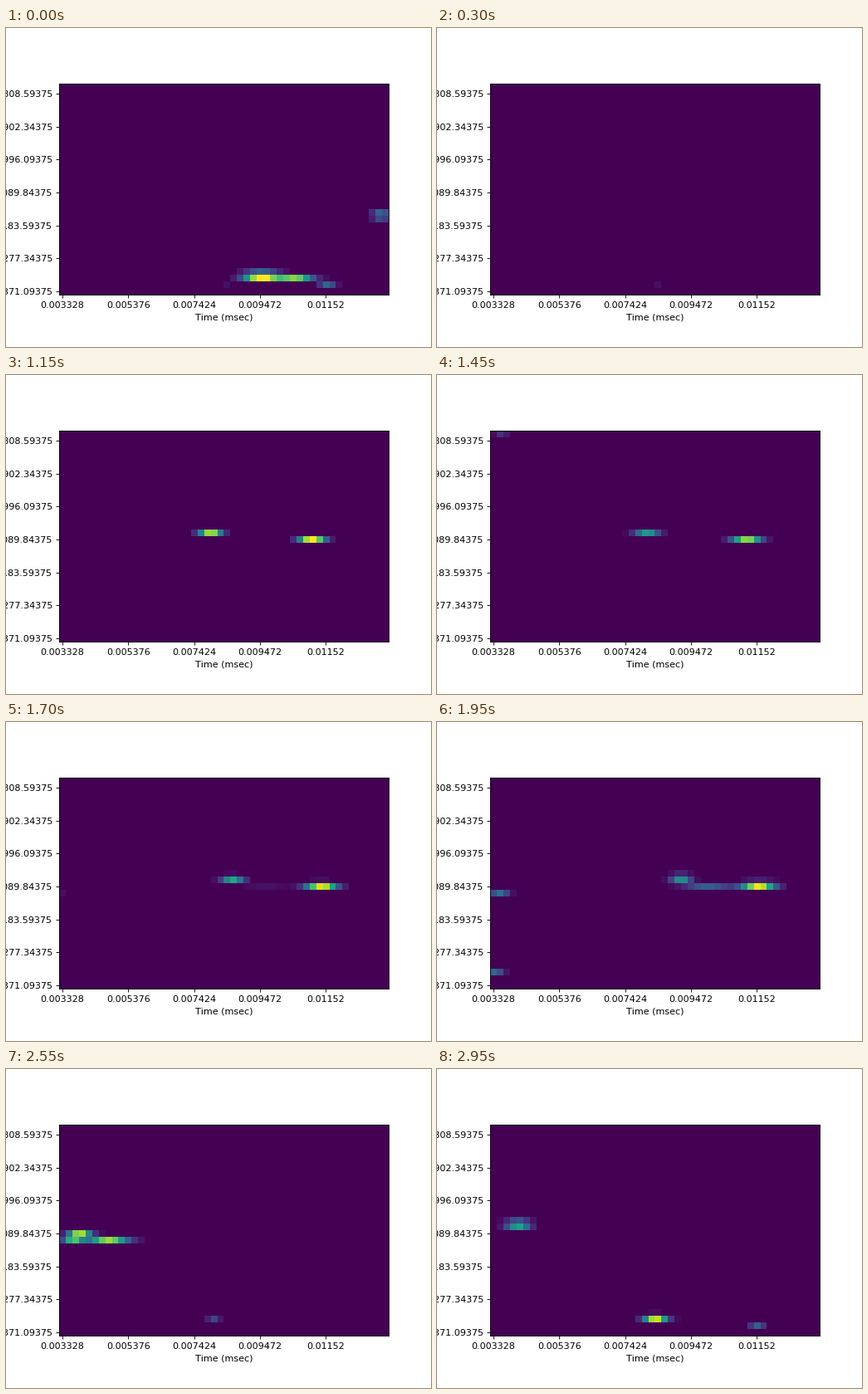
These frames come from a looping animation (512 px wide and 384 px high, 3000 ms). A matplotlib script:

```python
import numpy as np
import matplotlib.pyplot as plt
from matplotlib.animation import FuncAnimation

ROWS, COLS = 32, 50
FRAMES, INTERVAL = 60, 50
FADE = 6          # frames a pulse takes to appear or vanish
DRIFT = 0.35      # columns per frame while it fades
THICKNESS = 0.5   # rows
FLOOR = 0.025     # weaker energy is not shown

# Each pulse is a path of key points: (frame, column, row, width, peak).
PULSES = [
    # opening burst
    [(0, 30.2, 28.65, 2.6, 1.7)],
    [(0, 35.3, 29, 2.6, 0.8)],
    [(0, 40.2, 30, 1.3, 0.33)],
    [(0, 48.3, 19.45, 1.3, 0.75)],
    [(0, 25, 30, 0.4, 0.04), (8, 25, 30, 0.4, 0.04)],
    # two pulses in the middle band, the left one with a tail
    [(17, 21.6, 15, 1.6, 1.25), (29, 23.3, 15, 1.9, 0.55),
     (39, 28.5, 14.7, 1.5, 0.75)],
    [(39, 32.5, 16, 3.5, 0.3)],
    [(17, 37.3, 16, 1.7, 1.25), (29, 38.4, 16, 2.2, 0.85),
     (39, 40.2, 15.8, 2.5, 1.15)],
    [(29, 1.2, 0, 1, 0.14)],
    # pulses entering from the left
    [(39, 0.9, 17, 1.4, 0.37), (51, 1.6, 17, 1.5, 0.7)],
    [(51, 7, 17, 3, 0.85)],
    [(51, 2.6, 16, 1.7, 0.9), (59, 3.7, 14.6, 1.8, 1.1)],
    # returning burst in the low band
    [(39, 0.2, 29, 1.3, 0.35), (51, 22.9, 29.2, 1, 0.25),
     (59, 24.6, 28.9, 1.8, 1)],
    [(59, 40, 30, 1.2, 0.3)],
]

row_grid, col_grid = np.mgrid[:ROWS, :COLS]


def pulse_energy(keys, frame):
    times, *paths = zip(*keys)
    outside = frame - np.clip(frame, times[0], times[-1])
    col, row, width, peak = (np.interp(frame, times, path) for path in paths)
    col += DRIFT * outside
    peak *= max(0, 1 - abs(outside) / FADE)
    return peak * np.exp(-((col_grid - col) / width) ** 2
                         - ((row_grid - row) / THICKNESS) ** 2)


def spectrum(frame):
    energy = sum(pulse_energy(keys, frame) for keys in PULSES)
    return np.where(energy < FLOOR, 0, energy)


plt.rcParams["font.family"] = "DejaVu Sans"
plt.rcParams["text.kerning_factor"] = 6
fig, ax = plt.subplots(figsize=(6.4, 4.8), dpi=80)
image = ax.imshow(spectrum(0), cmap="viridis", vmin=0, vmax=1,
                  interpolation="nearest")

x_ticks = np.arange(0, COLS, 10)
y_ticks = np.arange(1, ROWS, 5)
ax.set_xticks(x_ticks, [f"{0.003328 + 0.0002048 * x:.6f}".rstrip("0")
                        for x in x_ticks])
ax.set_yticks(y_ticks, [str(5371.09375 + 781.25 * (ROWS - 1 - y))
                        for y in y_ticks])
ax.set_xlabel("Time (msec)")


def update(frame):
    image.set_data(spectrum(frame))
    return [image]


animation = FuncAnimation(fig, update, frames=FRAMES, interval=INTERVAL,
                          repeat=True, repeat_delay=0)
plt.show()
```
